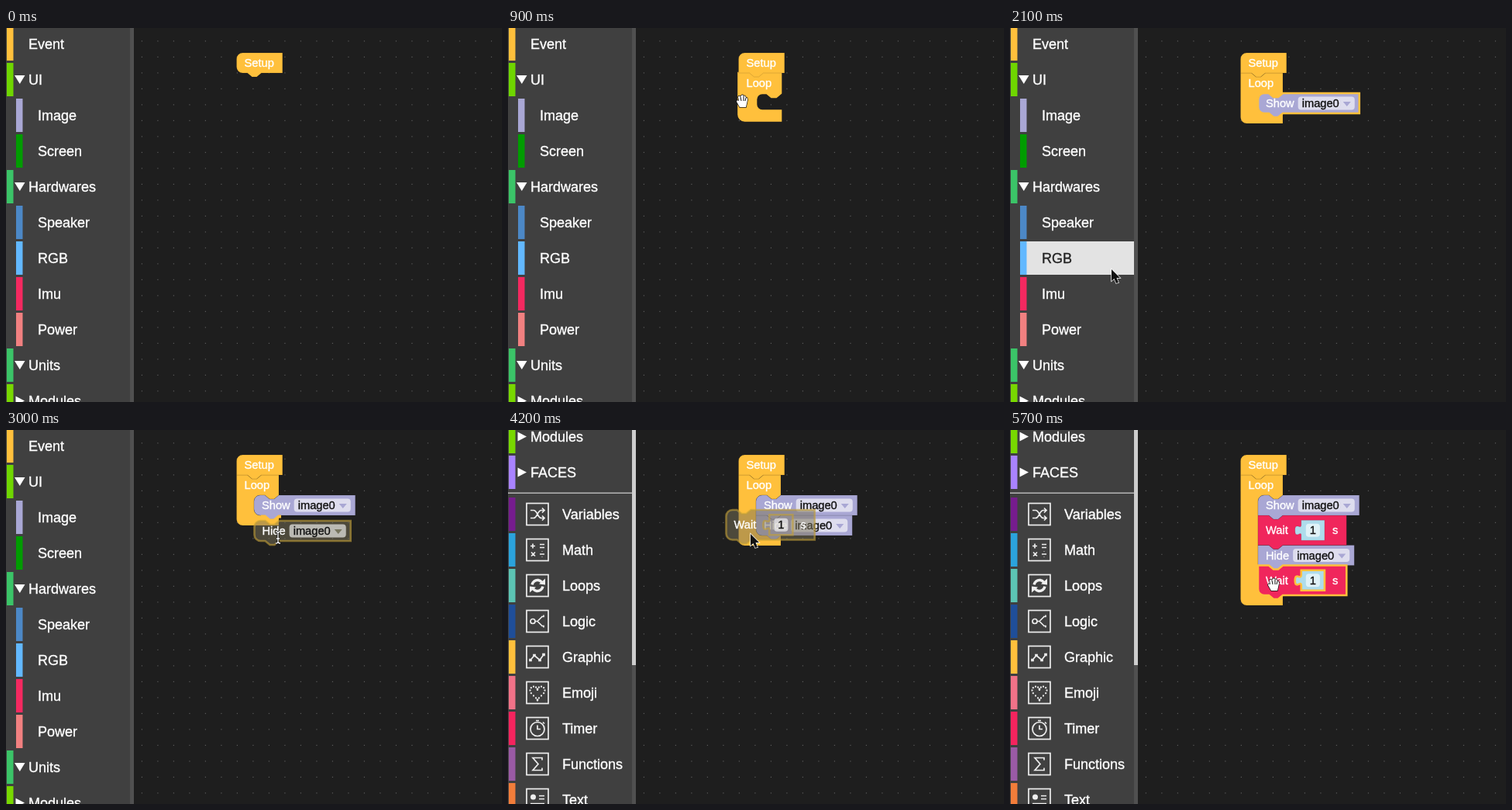
Write an HTML page with a canvas that moves like this. It is 640 by 482 pixels and loops after 6000 ms.

```html
<!DOCTYPE html>
<html lang="en">
<head>
<meta charset="utf-8">
<title>Block editor</title>
<style>
html, body { margin: 0; width: 100%; height: 100%; overflow: hidden; background: #1e1e1e; }
canvas { display: block; }
</style>
</head>
<body>
<canvas id="stage" width="640" height="482"></canvas>
<script>
const ctx = document.getElementById('stage').getContext('2d');
const YELLOW = '#ffc03c', LAVENDER = '#a9a7d4', RED = '#f0265c', BLUE = '#aedcec';
const FAMILY = '"Liberation Sans", Arial, sans-serif';
const ROW = 26, TALL = 38.5, ARM = 13, INDENT = 22.5, HOLLOW = 22.5;
const STEP = 300, LOOP = 6000;

// [label, colour, kind]
const upperMenu = [
  ['Event', YELLOW, 'top'], ['UI', '#6fd600', 'open'], ['Image', LAVENDER, 'sub'],
  ['Screen', '#009c00', 'sub'], ['Hardwares', '#3bc468', 'open'], ['Speaker', '#4c88c6', 'sub'],
  ['RGB', '#62b8ff', 'sub'], ['Imu', '#f42960', 'sub'], ['Power', '#f18080', 'sub'],
  ['Units', '#3bc468', 'open'], ['Modules', '#78d800', 'closed']
];
const lowerMenu = [
  ['Modules', '#78d800', 'closed'], ['FACES', '#a983ff', 'closed'], ['Variables', '#761c8e', 'icon'],
  ['Math', '#2ba3dc', 'icon'], ['Loops', '#5cc4b4', 'icon'], ['Logic', '#1f4e99', 'icon'],
  ['Graphic', YELLOW, 'icon'], ['Emoji', '#f17288', 'icon'], ['Timer', '#f5245e', 'icon'],
  ['Functions', '#9a5aa5', 'icon'], ['Text', '#f27d3a', 'icon']
];
// Icon strokes inside a 28 px box
const icons = {
  Variables: 'M5 9H9C14 9 14 19 19 19H23M5 19H9C14 19 14 9 19 9H23M20 6L23 9L20 12M20 16L23 19L20 22',
  Math: 'M5 9H11M8 6V12M17 7H23M17 11H23M6 17L11 22M11 17L6 22M17 19.500H23M20 16V16.500M20 22.500V23',
  Logic: 'M11 14H14L20 8M14 14L20 20M11 14a3 3 0 1 0 -6 0a3 3 0 1 0 6 0M19 8H22V6M19 20H22V22',
  Graphic: 'M5 18L10 12L17 18L22 11M4 17h2v2h-2zM9 11h2v2h-2zM16 17h2v2h-2zM21 10h2v2h-2z',
  Timer: 'M23 15a9 9 0 1 0 -18 0a9 9 0 1 0 18 0M14 10V15H18M12 4H16M21 6L23 8',
  Functions: 'M20 9V6H8L15 14L8 22H20V19',
  Text: 'M16 9H23M16 13H23M5 19H23M5 23H18'
};

// Labels: [dropdown] {text field} (number input)
const blocks = {
  setup: { label: 'Setup', color: YELLOW, hat: true, tail: true },
  loop: { label: 'Loop', color: YELLOW, mouth: true },
  show: { label: 'Show [image0]', color: LAVENDER, tail: true },
  hide: { label: 'Hide [image0]', color: LAVENDER, tail: true },
  wait: { label: 'Wait (1) s', color: RED, tail: true },
  waitMs: { label: 'Wait (1) ms', color: RED, tail: true },
  pressed: { label: 'Button [A] [wasPressed]', color: YELLOW, hat: true, mouth: true },
  obtain: { label: 'obtain button [A] [wasPressed]', color: YELLOW, value: true },
  both: { label: 'Button [A] + [B] press', color: YELLOW, hat: true, mouth: true },
  isPressed: { label: '[A] is [pressed]', color: YELLOW, value: true },
  callback: { label: 'timer callback {timer1}', color: YELLOW, hat: true, mouth: true },
  period: { label: 'Set [ ] period (100) ms mode [PERIODIC]', color: YELLOW, tail: true },
  setXY: { label: 'Set [image0] x (0) y (0)', color: LAVENDER, tail: true },
  setX: { label: 'Set [image0] x (0)', color: LAVENDER, tail: true },
  setY: { label: 'Set [image0] y (0)', color: LAVENDER, tail: true },
  setImage: { label: 'Set [image0] image [default.jpg]', color: LAVENDER, tail: true }
};
const flyouts = {
  Event: { right: 562, items: [['loop', 9], ['pressed', 97.5], ['obtain', 185], ['both', 236.7],
    ['isPressed', 324.5], ['callback', 375.7], ['period', 464]] },
  Image: { right: 458, items: [['show', 9], ['hide', 65], ['setXY', 119.5], ['setX', 186],
    ['setY', 252.5], ['setImage', 319.5]] },
  Timer: { right: 330, items: [['wait', 9], ['waitMs', 76]] }
};

const one = ['show'], two = ['show', 'hide'], three = ['show', 'wait', 'hide'];
const scenes = [
  {},
  { hover: 'Event', cursor: ['arrow', 100, 22] },
  { flyout: 'Event', cursor: ['hand', 182, 45] },
  { body: [], selected: 'loop', cursor: ['hand', 302, 94] },
  { body: [], flyout: 'Image', cursor: ['arrow', 105, 114] },
  { body: [], flyout: 'Image', picked: 0, cursor: ['hand', 225, 32] },
  { body: one, selected: 0, cursor: ['hand', 352, 107] },
  { body: one, selected: 0, hover: 'RGB', cursor: ['arrow', 131, 311] },
  { body: one, flyout: 'Image', cursor: ['arrow', 110, 116] },
  { body: one, flyout: 'Image', picked: 1, cursor: ['hand', 215, 87] },
  { body: one, drag: ['hide', 320.5, 117], marker: 111.5, cursor: ['beam', 351, 138] },
  { body: two, selected: 1, cursor: ['hand', 350, 133] },
  { body: two, lower: true, hover: 'Timer', cursor: ['arrow', 105, 386] },
  { body: two, lower: true, flyout: 'Timer', picked: 0, cursor: ['hand', 213, 38] },
  { body: two, lower: true, drag: ['wait', 281.5, 103], cursor: ['arrow', 313, 134] },
  { body: three, lower: true, selected: 1, cursor: ['hand', 345, 137] },
  { body: three, lower: true, selected: 1, cursor: ['arrow', 345, 137] },
  { body: three, lower: true, drag: ['wait', 341, 132], cursor: ['arrow', 362, 156] },
  { body: three, lower: true, drag: ['wait', 322, 181], marker: 176, cursor: ['hand', 342, 205] },
  { body: [...three, 'wait'], lower: true, selected: 3, cursor: ['hand', 340, 199] }
];

function rect(x, y, w, h, color, radius = 0) {
  ctx.fillStyle = color;
  ctx.beginPath();
  ctx.roundRect(x, y, w, h, radius);
  ctx.fill();
}
function polygon(color, ...points) {
  ctx.fillStyle = color;
  ctx.beginPath();
  for (let i = 0; i < points.length; i += 2) ctx.lineTo(points[i], points[i + 1]);
  ctx.fill();
}
// A hairline stroke gives the text its slightly heavier weight.
function write(text, x, y, color, size) {
  ctx.font = size + 'px ' + FAMILY;
  ctx.fillStyle = ctx.strokeStyle = color;
  ctx.lineWidth = 0.35;
  ctx.fillText(text, x, y);
  ctx.strokeText(text, x, y);
}
function textWidth(text) {
  ctx.font = '14.67px ' + FAMILY;
  return ctx.measureText(text).width;
}

function layout(label) {
  const parts = [];
  let x = 10, previous = '';
  for (const token of label.match(/\[.*?\]|\{.*?\}|\(.*?\)|[^[({]+/g)) {
    if (!token.trim()) continue;
    const kind = '[{('.includes(token[0]) ? token[0] : 'text';
    const text = kind === 'text' ? token.trim() : token.slice(1, -1);
    if (kind === '[' && previous === '[') x += 9;
    if (kind === '(') x += 7;
    const width = textWidth(text) + ({ '[': 15, '{': 2, '(': 22 }[kind] || 0);
    parts.push({ kind, text, x, width });
    x += width + 10;
    previous = kind;
  }
  return { parts, width: x + 1, height: label.includes('(') ? TALL : ROW };
}

function outline(x, y, w, h, o) {
  const path = new Path2D(), bottom = o.mouth ? y + h + o.hollow + ARM : y + h;
  const notch = [[14, 0], [20, 5], [26, 5], [32, 0]];
  const follow = (points, left, top) => points.forEach(([dx, dy]) => path.lineTo(left + dx, top + dy));
  const followBack = (left, top) => follow([...notch].reverse(), left, top);
  if (o.value) {
    path.moveTo(x, y);
  } else {
    path.moveTo(x, y + 8);
    if (o.squareTop) path.lineTo(x, y);
    else path.arcTo(x, y, x + 8, y, 8);
    if (!o.hat) follow(notch, x, y);
  }
  path.lineTo(x + w, y);
  path.lineTo(x + w, y + h);
  if (o.mouth) {
    const left = x + INDENT, floor = y + h + o.hollow;
    followBack(left, y + h);
    path.arcTo(left, y + h, left, y + h + 8, 8);
    path.arcTo(left, floor, left + 8, floor, 8);
    path.lineTo(x + w, floor);
    path.lineTo(x + w, bottom);
  }
  if (o.tail) followBack(x, bottom);
  if (o.value || o.squareBottom) path.lineTo(x, bottom);
  else path.arcTo(x, bottom, x, bottom - 8, 8);
  if (o.value) {
    path.lineTo(x, y + 19);
    path.bezierCurveTo(x, y + 13, x - 8, y + 25, x - 8, y + 13);
    path.bezierCurveTo(x - 8, y + 2, x, y + 13, x, y + 6);
  }
  path.closePath();
  return path;
}

function paint(path, color, selected, ghost) {
  ctx.fillStyle = color;
  ctx.fill(path);
  ctx.strokeStyle = ghost ? 'rgba(195,160,55,.6)' : selected ? YELLOW : 'rgba(0,0,0,.13)';
  ctx.lineWidth = ghost || selected ? 2.6 : 1;
  ctx.stroke(path);
}

function drawBlock(name, x, y, options = {}) {
  const block = blocks[name], { selected, ghost } = options;
  const { parts, width, height } = layout(block.label);
  const middle = y + height / 2, baseline = middle + 5;
  const w = block.mouth ? Math.max(width, INDENT + 32) : width;
  const shape = outline(x, y, w, height, { hollow: HOLLOW, ...block, ...options });
  paint(shape, ghost ? 'rgba(125,117,88,.5)' : block.color, selected, ghost);
  for (const part of parts) {
    const left = x + part.x;
    if (part.kind === 'text') {
      write(part.text, left, baseline, '#fff', 14.67);
      continue;
    }
    let textX = left;
    if (part.kind === '(') {
      const socket = outline(left, middle - 13, part.width, 26, { value: true });
      paint(socket, ghost ? 'transparent' : BLUE, selected, ghost);
      textX += 11;
    }
    const boxWidth = part.width + (part.kind === '(' ? -12 : 10);
    rect(textX - 5, middle - 8.5, boxWidth, 17, 'rgba(255,255,255,.62)', 4);
    write(part.text, textX, baseline, '#111', 14.67);
    if (part.kind === '[') {
      const tip = left + part.width;
      polygon(ghost ? '#77755f' : block.color, tip - 10, middle - 2, tip, middle - 2, tip - 5, middle + 4);
    }
  }
}

function drawProgram({ body, selected, drag, marker }) {
  const x = 297.5, top = 32;
  if (body) {
    const heights = body.map(name => layout(blocks[name].label).height);
    const hollow = heights.reduce((sum, h) => sum + h, 0) || HOLLOW;
    drawBlock('loop', x, top + ROW, { hollow, squareTop: true, selected: selected === 'loop' });
  }
  drawBlock('setup', x, top, { squareBottom: !!body });
  if (body) {
    const rows = [];
    let y = top + 2 * ROW;
    body.forEach((name, i) => {
      rows.push([name, y, { squareTop: i > 0, squareBottom: i < body.length - 1, selected: i === selected }]);
      y += layout(blocks[name].label).height;
    });
    // Tabs overlap the block below, so paint upwards; the selected block goes last.
    rows.reverse().sort((a, b) => a[2].selected - b[2].selected);
    for (const [name, rowY, options] of rows) drawBlock(name, x + INDENT, rowY, options);
  }
  if (marker) {
    ctx.strokeStyle = YELLOW;
    ctx.lineWidth = 4;
    ctx.stroke(new Path2D(`M329 ${marker}h5l6 5h6l6 -5h3`));
  }
  if (drag) drawBlock(...drag, { ghost: true });
}

function drawIcon(name, x, y) {
  ctx.save();
  ctx.translate(x, y);
  ctx.strokeStyle = '#eee';
  ctx.lineWidth = 1.7;
  ctx.strokeRect(0, 0, 28, 28);
  if (name === 'Loops') {
    ctx.lineWidth = 3.5;
    for (const turn of [0, Math.PI]) {
      ctx.beginPath();
      ctx.arc(14, 14, 7, turn + 3.3, turn + 5.7);
      ctx.stroke();
      ctx.save();
      ctx.translate(14, 14);
      ctx.rotate(turn);
      polygon('#eee', 10, -9, 10, -1, 2, -2);
      ctx.restore();
    }
  } else if (name === 'Emoji') {
    for (let i = 0; i < 20; i++) {
      const a = i / 20 * 2 * Math.PI, s = Math.sin(a);
      const dy = 13 * Math.cos(a) - 5 * Math.cos(2 * a) - 2 * Math.cos(3 * a) - Math.cos(4 * a);
      rect(13 + 9.5 * s ** 3, 12.5 - dy * .62, 2, 2, '#eee');
    }
  } else {
    ctx.stroke(new Path2D(icons[name]));
    if (name === 'Text') rect(5, 7, 7, 7, '#eee', 4);
  }
  ctx.restore();
}

function drawMenu({ lower, hover, flyout }) {
  rect(0, 0, 160, 482, '#404040');
  rect(160, 0, 5, 482, '#505050');
  if (lower) {
    rect(160, 0, 5, 303, '#cdcdcd');
    rect(0, 80.5, 160, 1.5, '#b5b5b5');
  }
  (lower ? lowerMenu : upperMenu).forEach(([label, color, kind], i) => {
    const middle = 46 * i + (lower ? (i < 2 ? 8.5 : 16.5) : 20.5);
    const left = kind === 'sub' ? 13 : 1, top = middle - 21.5;
    const hovered = hover === label;
    if (hovered) rect(left, top, 160 - left, 43, '#e3e3e3');
    rect(left, top, flyout === label ? 160 - left : 8.5, 43, color);
    if (kind === 'open') polygon('#fff', 11, middle - 5.5, 24.5, middle - 5.5, 17.8, middle + 5.5);
    if (kind === 'closed') polygon('#fff', 12.5, middle - 6, 24, middle, 12.5, middle + 6);
    if (kind === 'icon') drawIcon(label, 24, middle - 14);
    const textX = { sub: 41, icon: 70 }[kind] || 29;
    write(label, textX, middle + 6, hovered ? '#222' : '#fff', 18);
  });
}

function drawFlyout({ flyout, picked }) {
  const { right, items } = flyouts[flyout];
  rect(165, 0, right - 165, 482, 'rgba(48,48,48,.88)', [0, 8, 8, 0]);
  items.forEach(([name, y], i) => drawBlock(name, 181, y, { selected: i === picked }));
}

const pointers = {
  arrow: 'M0 0V15L3.500 12L6 18L9 17L6.500 11H11Z',
  hand: 'M-3 8L-7 1Q-7 -2 -4 0L-5 -5Q-4 -8 -2 -5L-1 -7Q1 -9 2 -6Q4 -8 5 -4Q7 -5 7 -1L5 8Z',
  beam: 'M-3 -7Q0 -7 0 -5Q0 -7 3 -7M0 -5V6M-3 8Q0 8 0 6Q0 8 3 8M-2 2H2'
};
function drawCursor([kind, x, y]) {
  const path = new Path2D(pointers[kind]);
  ctx.save();
  ctx.translate(x, y);
  ctx.lineWidth = kind === 'beam' ? 3 : 1.4;
  ctx.strokeStyle = kind === 'arrow' ? '#fff' : '#111';
  ctx.stroke(path);
  if (kind === 'beam') {
    ctx.lineWidth = 1.3;
    ctx.strokeStyle = '#fff';
    ctx.stroke(path);
  } else {
    ctx.fillStyle = kind === 'arrow' ? '#111' : '#fff';
    ctx.fill(path);
  }
  if (kind === 'hand') {
    ctx.lineWidth = 1;
    ctx.stroke(new Path2D('M-2 -5L-1 0M2 -6V0M5 -4L4 0'));
  }
  ctx.restore();
}

function draw(scene) {
  rect(0, 0, 640, 482, '#1e1e1e');
  for (let x = 174.8; x < 640; x += 20.5)
    for (let y = 16.3; y < 482; y += 20.5) rect(x, y, 1.2, 1.2, '#595959');
  drawProgram(scene);
  if (scene.flyout) drawFlyout(scene);
  drawMenu(scene);
  if (scene.cursor) drawCursor(scene.cursor);
}

function tick() {
  draw(scenes[Math.floor(performance.now() % LOOP / STEP)]);
  requestAnimationFrame(tick);
}
tick();
</script>
</body>
</html>
```
